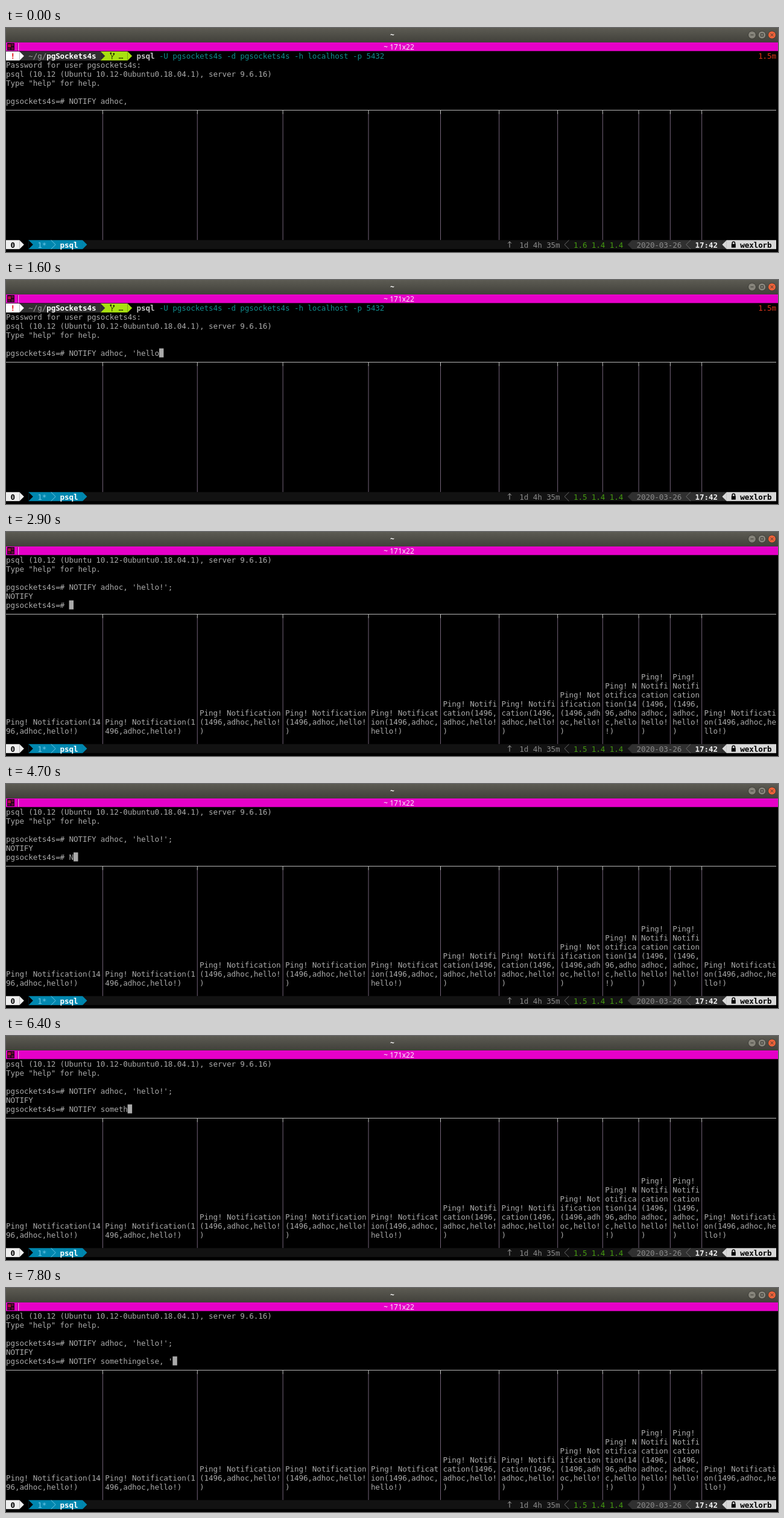
An HTML page with a canvas for the animation above (8000 ms loop, 1280x372 px).

```html
<!DOCTYPE html>
<html lang="en">
<head>
<meta charset="utf-8">
<title>Terminal</title>
<style>
  html, body { margin: 0; width: 100%; height: 100%; overflow: hidden; background: #000; }
  canvas { display: block; width: 1280px; height: 372px; }
</style>
</head>
<body>
<canvas id="stage" width="1280" height="372"></canvas>
<script>
const ctx = document.getElementById('stage').getContext('2d');
const LOOP = 8000;
const COLS = 171, ROWS = 22, TOP = 39;
const CW = 1277 / COLS, RH = 328.2 / ROWS;
const MONO = '12.6px "DejaVu Sans Mono", monospace';
const GREY = '#aaaaaa', WHITE = '#eeeeee', DARK = '#303030', BAR = '#121212', BLUE = '#0087af', GREEN = '#a8e010';
const PANE_SEPARATORS = [21, 42, 61, 80, 96, 109, 122, 132, 140, 147, 154];
const PROMPT = 'pgsockets4s=# ';
const FIRST = "NOTIFY adhoc, 'hello!';";
const SECOND = "NOTIFY somethingelse, '";
const SENT_AT = 2900;

// [time in ms, characters typed]
const FIRST_KEYS = [[0, 13], [700, 14], [1000, 15], [1200, 16], [1300, 18], [1600, 20], [2000, 21], [2200, 22], [2400, 23]];
const SECOND_KEYS = [[2900, 0], [4700, 1], [4800, 2], [4900, 4], [5000, 5], [5100, 6], [5300, 7],
  [6100, 8], [6200, 10], [6300, 11], [6400, 13], [6600, 14], [6700, 16],
  [6900, 17], [7000, 18], [7100, 20], [7600, 22], [7800, 23]];

const x = col => col * CW;
const y = row => TOP + row * RH;
const typed = (keys, t) => keys.filter(key => key[0] <= t).pop()[1];

function rect(left, top, width, height, color) {
  ctx.fillStyle = color;
  ctx.fillRect(left, top, width, height);
}

function cells(col, row, count, color) {
  rect(x(col), y(row), count * CW, RH, color);
}

function write(text, col, row, color = GREY, bold = false) {
  ctx.font = (bold ? 'bold ' : '') + MONO;
  ctx.textAlign = 'left';
  ctx.textBaseline = 'alphabetic';
  ctx.fillStyle = color;
  const baseline = Math.round(y(row) + 12.4);
  [...text].forEach((char, i) => ctx.fillText(char, x(col + i), baseline));
}

function path(points, color, stroke = false) {
  ctx.beginPath();
  points.forEach(([px, py]) => ctx.lineTo(px, py));
  ctx.lineWidth = 1;
  ctx.fillStyle = ctx.strokeStyle = color;
  stroke ? ctx.stroke() : ctx.fill();
}

// Powerline arrow filling one cell; dir is 1 for right, -1 for left.
function arrow(col, row, dir, color, thin = false) {
  const base = x(dir > 0 ? col : col + 1);
  path([[base, y(row)], [base + dir * CW, y(row) + RH / 2], [base, y(row) + RH]], color, thin);
}

function circle(cx, cy, radius, color) {
  ctx.beginPath();
  ctx.arc(cx, cy, radius, 0, 2 * Math.PI);
  ctx.fillStyle = color;
  ctx.fill();
}

function label(text, cx, cy, font) {
  ctx.font = font;
  ctx.textAlign = 'center';
  ctx.textBaseline = 'middle';
  ctx.fillStyle = '#fff';
  ctx.fillText(text, cx, cy);
}

function drawWindow() {
  rect(0, 0, 1280, 372, '#000');
  const shade = ctx.createLinearGradient(0, 0, 0, 24);
  shade.addColorStop(0, '#5c5b53');
  shade.addColorStop(1, '#41403a');
  rect(0, 0, 1280, 24, shade);
  label('~', 640.5, 13, 'bold 12px "Open Sans", sans-serif');

  const ink = '#3a3934';
  [1237, 1253.5].forEach(cx => {
    circle(cx, 11.5, 6.8, ink);
    circle(cx, 11.5, 6, '#85837a');
  });
  circle(1270, 11.5, 6.8, ink);
  circle(1270, 11.5, 6, '#ee6239');
  path([[1234.5, 11.5], [1239.5, 11.5]], ink, true);
  ctx.strokeRect(1251.5, 9.5, 4, 4);
  path([[1267.7, 9.2], [1272.3, 13.8]], ink, true);
  path([[1272.3, 9.2], [1267.7, 13.8]], ink, true);

  rect(0, 24, 1280, 14.3, '#e600c8');
  rect(2, 25, 12, 12, '#1c0618');
  rect(3, 27, 5, 5, '#b00c40');
  rect(9, 26, 4, 4, '#5c0c34');
  rect(3, 33, 4, 3, '#5c0c34');
  rect(9, 32, 4, 4, '#5c0c34');
  rect(19, 25, 1, 13, '#8c0078');
  rect(20, 25, 1, 13, '#ffb0f4');
  label('~ 171x22', 651.5, 32.5, '12px "Open Sans", sans-serif');
}

function drawPaneBorders() {
  const rule = 136;
  for (const col of PANE_SEPARATORS) {
    const left = x(col + 0.5) - 0.65;
    rect(left, rule, 1, 7, '#c8c8c8');
    rect(left, rule + 7, 1, y(21) - rule - 7, '#74647a');
  }
  rect(0, rule, 1277, 1, '#b8b8b8');
}

function drawShellPrompt() {
  cells(0, 0, 3, '#fff');
  cells(3, 0, 18, DARK);
  cells(21, 0, 6, GREEN);
  arrow(3, 0, 1, '#fff');
  arrow(21, 0, 1, DARK);
  arrow(27, 0, 1, GREEN);
  write('!', 1, 0, '#e00000', true);
  write('~/g/', 5, 0, '#a0a0a0');
  write('pgSockets4s', 9, 0, '#fff', true);
  const bx = x(23), by = y(0);
  path([[bx + 2, by + 2], [bx + 2, by + 5], [bx + 4, by + 7], [bx + 4, by + 13]], '#202800', true);
  path([[bx + 7, by + 3], [bx + 7, by + 6], [bx + 4, by + 9]], '#202800', true);
  circle(bx + 2, by + 3, 1.4, '#202800');
  circle(bx + 7, by + 4, 1.4, '#202800');
  write('…', 25, 0, '#202800');
  write('psql', 29, 0, '#c4c4c4', true);
  write('-U pgsockets4s -d pgsockets4s -h localhost -p 5432', 34, 0, '#108c8e');
  write('1.5m', 167, 0, '#e0381c');
}

function drawStatus(load) {
  const row = 21, mid = y(row) + RH / 2;
  cells(5, row, 166, BAR);
  cells(0, row, 3, WHITE);
  arrow(3, row, 1, WHITE);
  write('0', 1, row, '#000', true);

  cells(5, row, 12, BLUE);
  arrow(5, row, 1, '#000');
  arrow(17, row, 1, BLUE);
  write('1*', 7, row, '#6cc8e8');
  arrow(10, row, 1, '#6cc8e8', true);
  write('psql', 12, row, '#fff', true);

  path([[835, mid + 5], [835, mid - 5]], GREY, true);
  path([[832, mid - 2], [835, mid - 5], [838, mid - 2]], GREY, true);
  write('1d 4h 35m', 114, row, '#8a8a8a');
  arrow(124, row, -1, '#6a6a6a', true);
  write(load + ' 1.4 1.4', 126, row, '#459a10');

  cells(139, row, 20, DARK);
  arrow(138, row, -1, DARK);
  write('2020-03-26', 140, row, '#8a8a8a');
  arrow(151, row, -1, '#707070', true);
  write('17:42', 153, row, WHITE, true);

  cells(159, row, 1, DARK);
  cells(160, row, 11, '#d8d8d8');
  arrow(159, row, -1, '#d8d8d8');
  const lock = x(161);
  rect(lock + 0.5, mid - 1, 7, 6, '#000');
  ctx.strokeStyle = '#000';
  ctx.lineWidth = 1.5;
  ctx.beginPath();
  ctx.arc(lock + 4, mid - 2.5, 2.2, Math.PI, 0);
  ctx.lineTo(lock + 6.2, mid);
  ctx.moveTo(lock + 1.8, mid - 2.5);
  ctx.lineTo(lock + 1.8, mid);
  ctx.stroke();
  write('wexlorb', 163, row, '#000', true);
}

function drawNotifications() {
  const message = 'Ping! Notification(1496,adhoc,hello!)';
  const starts = [0, ...PANE_SEPARATORS.map(col => col + 1)];
  const ends = [...PANE_SEPARATORS, COLS];
  starts.forEach((start, i) => {
    const lines = message.match(new RegExp(`.{1,${ends[i] - start}}`, 'g'));
    lines.forEach((line, n) => write(line, start, 20 - lines.length + n));
  });
}

function drawInput(text, cursor) {
  write(PROMPT + text, 0, 5);
  if (cursor) cells(PROMPT.length + text.length, 5, 1, GREY);
}

function draw(t) {
  drawWindow();
  drawPaneBorders();
  drawStatus(t < 600 ? '1.6' : '1.5');
  const version = 'psql (10.12 (Ubuntu 10.12-0ubuntu0.18.04.1), server 9.6.16)';
  const help = 'Type "help" for help.';
  if (t < SENT_AT) {
    drawShellPrompt();
    ['Password for user pgsockets4s:', version, help].forEach((line, i) => write(line, 0, i + 1));
    drawInput(FIRST.slice(0, typed(FIRST_KEYS, t)), t >= 600);
  } else {
    [version, help, '', PROMPT + FIRST, 'NOTIFY'].forEach((line, i) => write(line, 0, i));
    drawNotifications();
    drawInput(SECOND.slice(0, typed(SECOND_KEYS, t)), t < 3400 || t >= 4000);
  }
}

const began = performance.now();
function tick() {
  draw((performance.now() - began) % LOOP);
  requestAnimationFrame(tick);
}
tick();
</script>
</body>
</html>
```
